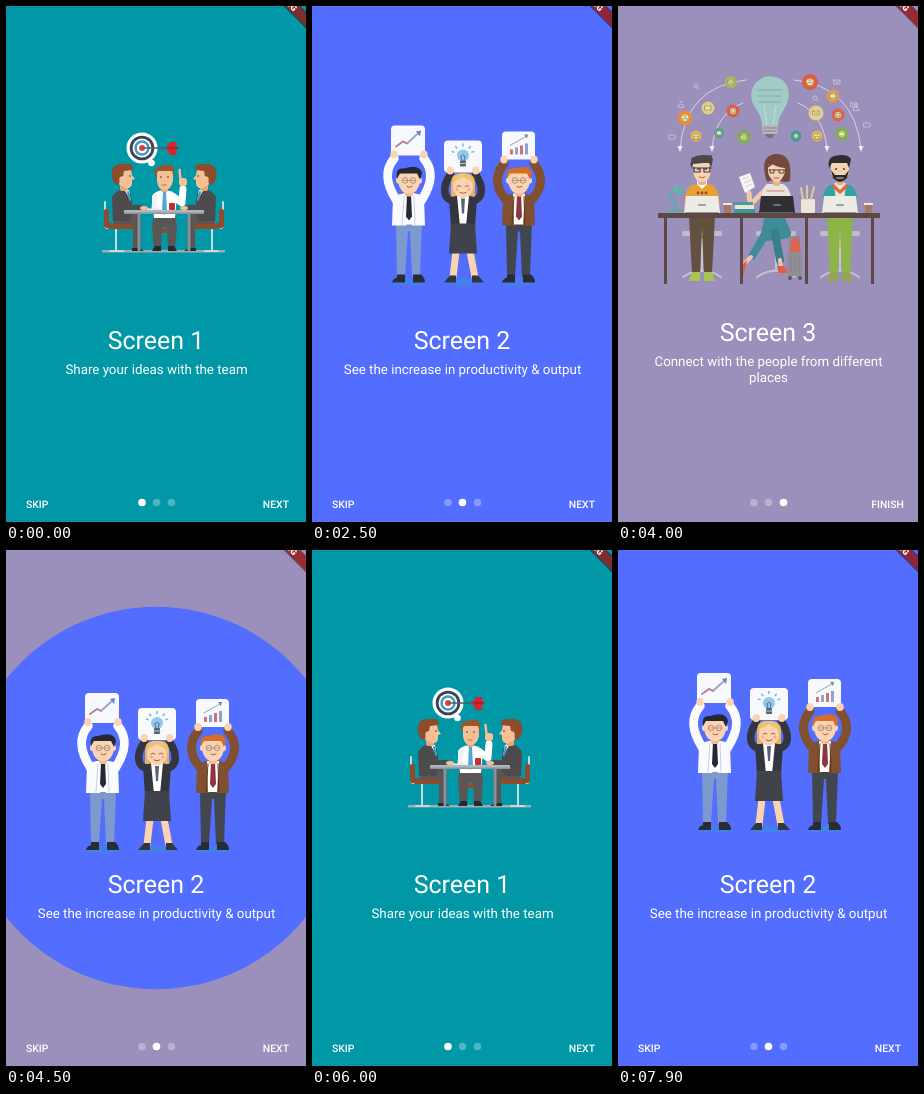
These frames come from a looping animation (300x516 px, 8 s). An HTML page:

```html
<!DOCTYPE html>
<html lang="en">
<head>
<meta charset="utf-8">
<title>Onboarding</title>
<style>
  html, body { margin: 0; width: 100%; height: 100%; overflow: hidden; }
  #stage { position: relative; width: 300px; height: 516px; overflow: hidden; }
  .page, svg { position: absolute; left: 0; top: 0; width: 300px; height: 516px; }
  text { font-family: Roboto, sans-serif; fill: #fff; text-rendering: geometricPrecision; }
  .title { font-size: 25px; text-anchor: middle; }
  .body { font-size: 13.33px; text-anchor: middle; }
  .button { font-size: 10.4px; font-weight: 500; }
  .banner { font-size: 8.5px; font-weight: 900; text-anchor: middle; }
  #controls { z-index: 5; }
</style>
</head>
<body>
<div id="stage"></div>
<script>
const LOOP = 8000, STEP = 100, SINK = 400, REVEAL = 380, DROP = 50;
const CENTER = '150px 248px', FULL_RADIUS = 308;

// Each swap lowers the artwork, opens the next page in a circle, then lifts the artwork.
const swaps = [
  { to: 1, down: 1470, reveal: 1729, up: 1870 },
  { to: 2, down: 2380, reveal: 2790, up: 2981 },
  { to: 1, down: 3960, reveal: 4264, up: 4396 },
  { to: 0, down: 5300, reveal: 5600, up: 5764 },
  { to: 1, down: 7200, reveal: 7500, up: 7655 },
];

const rect = (x, y, w, h, fill, r = 0) =>
  `<rect x="${x}" y="${y}" width="${w}" height="${h}" rx="${r}" fill="${fill}"/>`;
const disc = (x, y, r, fill) => `<circle cx="${x}" cy="${y}" r="${r}" fill="${fill}"/>`;
const oval = (x, y, rx, ry, fill) =>
  `<ellipse cx="${x}" cy="${y}" rx="${rx}" ry="${ry}" fill="${fill}"/>`;
const shape = (d, fill) => `<path d="${d}" fill="${fill}"/>`;
const line = (d, color, width = 1) =>
  `<path d="${d}" fill="none" stroke="${color}" stroke-width="${width}" stroke-linecap="round" stroke-linejoin="round"/>`;
const move = (x, y, content) => `<g transform="translate(${x} ${y})">${content}</g>`;
const mirror = (axis, content) =>
  `<g transform="translate(${axis * 2} 0) scale(-1 1)">${content}</g>`;

const SKIN = '#fbd3b0', DARK = '#34363f';

function meeting() {
  const suit = '#4d4b4b', pants = '#5b5654', steel = '#cbd8dc', wood = '#8d4c2c', face = '#f6bf95';
  const seated =
    line('M99 196V220Q99 222 102 222H110V244', steel, 2) + line('M104 245H117', steel, 2) +
    rect(98, 203, 5, 19, wood, 2) + rect(102, 217, 25, 6, wood, 1) +
    shape('M108 207H129Q135 208 135 214V243H127V218H108Z', pants) +
    shape('M126 242H133L138 245H126Z', '#26282c') +
    shape('M106 191Q110 184 117 183L125 188 127 205 124 215H107Z', suit) +
    shape('M118 183L123 184 125 195Z', '#fff') +
    line('M122 186L124 194', '#399bc4', 2) +
    line('M113 191Q113 201 121 202H134', suit, 6) +
    oval(138, 202, 4, 2, face) +
    rect(114, 176, 8, 9, '#e8a67a', 2) +
    shape('M113 164H125L126 169 129 173 126 174V178Q125 183 119 182L112 178Z', face) +
    shape('M106 172Q104 160 113 158H122Q128 158 127 164L118 165 117 170 114 171 113 179Q108 179 106 172Z', wood) +
    disc(115, 173, 1.7, face) + disc(124, 170, .8, '#333');
  const boss =
    rect(148, 222, 22, 5, wood, 1) +
    shape('M148 208H169L171 220 169 244H162L161 221H156L155 244H148L146 220Z', pants) +
    shape('M146 245L149 240H155V245ZM162 240H168L171 245H162Z', '#26282c') +
    line('M168 191L176 197 177 183', '#fff', 7) +
    shape('M146 190Q149 185 157 184Q167 184 171 190L169 212H148Z', '#fff') +
    line('M149 190L148 203 157 207', '#eef3f5', 5) +
    shape('M157 186H160L161 205 158.500 209 156 205Z', '#4ea7d4') +
    rect(155, 179, 7, 7, '#e8a67a', 2) +
    shape('M151 164H167V175Q165 184 158.500 184Q152 184 151 175Z', face) +
    shape('M149 171Q147 160 155 160Q164 156 168 162L168 171 166 165H152Z', '#9b552d') +
    disc(155, 171, .8, '#333') + disc(162, 171, .8, '#333') + line('M156 179H160', '#a55', .8) +
    rect(173, 172, 8, 8, face, 3) + line('M174.500 173L173.500 164', face, 2.4);
  const target = disc(136, 142, 15.5, '#fff') + disc(145.500, 157, 3.3, '#fff') +
    [[12.3, '#384454'], [9.5, '#fff'], [7.7, '#459ac1'], [5.2, '#fff'], [3, '#d94736']]
      .map(([r, c]) => disc(136, 142, r, c)).join('') +
    line('M137 142H164', '#555d66', 1.5) +
    shape('M160 142L164 136H171L169 139 173 142 169 145 171 149H164Z', '#d8232d') +
    line('M162 142H171', '#861f25', 1);
  return rect(96, 244, 123, 2.5, '#9eacb4') + boss + seated + mirror(158, seated) +
    line('M133 207V244M183 207V244', '#87919a', 3) +
    rect(118, 204, 80, 4, '#aeb7bd', 1) + rect(118, 206.500, 80, 1.5, '#8b959b') +
    rect(163, 197, 6, 7, '#c42d35', 1) + rect(141, 202.500, 13, 1.5, '#e7edf0') + target;
}

function cheering() {
  const arms = (width, y, color, thick) => [-1, 1].map(s =>
    line(`M${s * width * .74} ${y + 5}C${s * width * 1.24} ${y + 17} ${s * width * 1.17} ${y + 30} ${s * width * .62} 194`, color, thick) +
    oval(s * width * .75, y + 1, 3.7, 4, SKIN)).join('');
  const card = (x, y, w, h) => rect(x, y, w, h, '#f7f9fd', 4);
  const faceMarks = line('M-6 174H6', '#9a8371', .7) +
    [-4, 4].map(x => `<circle cx="${x}" cy="174" r="2.800" fill="none" stroke="#9a8371" stroke-width=".8"/>`).join('') +
    line('M-2 180Q0 182 3 180', '#a75b4c', 1);
  const shadow = oval(0, 275.500, 18, 3.5, '#4380eb');
  const man = (coat, shade, pants, hair, tie, handY) =>
    shadow +
    shape('M-13 215H13L11 270H3L1 225H-1L-4 270H-12Z', pants) +
    shape('M-12 268H-4V276H-17Q-16 272 -12 271ZM4 268H12Q16 271 16 276H4Z', '#292c37') +
    arms(20, handY, coat, 9) +
    shape('M-16 191Q-8 186 0 187Q9 186 15 191L16 219H3L0 200-3 219H-17Z', coat) +
    shape('M-6 187H6L4 218H-5Z', '#fff') + line('M-5 190L-7 218M5 190L6 218', shade) +
    shape('M-2 188H2L3 210 0 214-3 210Z', tie) +
    rect(-4, 181, 8, 9, '#f1ba8f', 2) +
    shape('M-11 165H11V176Q8 188 0 187Q-8 188-11 176Z', SKIN) +
    oval(-11, 174, 2, 3, SKIN) + oval(11, 174, 2, 3, SKIN) +
    shape('M-12 172Q-14 161-5 162Q11 157 13 167L11 173 8 167H-9Z', hair) + faceMarks;
  const woman = shadow +
    line('M-7 245L-10 271M7 245L12 271', SKIN, 7) +
    shape('M-13 269H-7V276H-19ZM9 269H15L21 276H9Z', DARK) +
    arms(17, 163, DARK, 7.5) +
    shape('M-11 171Q-7 166 0 167Q11 166 12 175V190H-12V176Z', '#e9b35e') +
    shape('M-14 192Q0 185 14 192L12 221H-12Z', DARK) +
    shape('M-6 189H6L3 220H-3Z', '#fff') + shape('M-2 192H2L1 207H-1Z', '#536173') +
    shape('M-12 217H12L14 247H-14Z', '#41434c') +
    rect(-4, 184, 8, 7, '#f1ba8f', 2) +
    oval(0, 180.500, 10, 10.5, SKIN) + shape('M-11 179Q-11 167 0 167Q11 167 11 179L8 174Q3 173 0 170Q-3 173-8 174Z', '#f0c16f') +
    line('M-6 180Q-4 178-2 180M2 180Q4 178 6 180M-3 186Q0 188 3 186', '#8d5845', .9) +
    disc(-6, 183, 1.5, '#f4a88d') + disc(6, 183, 1.5, '#f4a88d');
  const rays = [-70, -40, 0, 40, 70].map(a =>
    `<path d="M0-9V-12" stroke="#71b7e5" stroke-width="1.500" transform="translate(151 149) rotate(${a})"/>`).join('');
  const bulb = disc(151, 149, 6, '#90c8ec') + line('M149 150L150 155M153 150L152 155M149 150L151 148 153 150', '#496c94', .9) +
    rect(148, 154, 6, 6, '#55646f', 1) + line('M148 157H154', '#b7c7d0') + rays;
  return card(79, 119, 34, 30) + line('M84 140L91 135 95 137 107 126', '#9aa9d0', 2) +
    line('M84 140L91 135 95 137', '#cf7377', 1.3) + shape('M104 125L109 124 108 130Z', '#6382d3') +
    card(132, 134, 38, 32) + bulb +
    card(190, 125, 33, 28) +
    [0, 1, 2, 3].map(i => rect(198 + i * 5, 143 - i * 2, 3, 5 + i * 2, i % 2 ? '#8ca4cf' : '#d06f75')).join('') +
    line('M198 139L205 135 214 130', '#8b99b6', .9) + shape('M212 128L216 128 215 132Z', '#7183ae') +
    move(97, 0, man('#fafbff', '#c5d0e5', '#7d9acf', '#252832', '#242936', 147)) +
    move(151, 0, woman) +
    move(207, 0, man('#805030', '#603719', '#42464e', '#d66e28', '#8d3641', 152));
}

function connected() {
  const desktop = '#5d4844';
  const laptop = (x, fill, dot) =>
    shape(`M${x - 16} 202H${x + 16}L${x + 18} 219H${x - 18}Z`, fill) + line(`M${x - 3} 211H${x + 3}`, dot, 2) +
    line(`M${x - 16} 219H${x + 16}`, '#777b82', 1.3);
  const chair = x => line(`M${x} 245V277M${x - 19} 283Q${x} 270 ${x + 19} 283`, '#c9c3cf', 2) +
    rect(x - 20, 237, 40, 5, '#c4bbcb', 2);
  const legs = (x, fill, shoe) =>
    shape(`M${x - 13} 222H${x + 13}L${x + 10} 280H${x + 2}L${x} 234 ${x - 2} 280H${x - 10}Z`, fill) +
    shape(`M${x - 10} 278H${x - 2}V287H${x - 13}ZM${x + 2} 278H${x + 10}L${x + 13} 287H${x + 2}Z`, shoe);
  const head = (x, hair, chin = '') => rect(x - 4, 181, 8, 10, '#e8b28b', 2) +
    shape(`M${x - 9} 168H${x + 9}V178Q${x + 7} 188 ${x} 188Q${x - 7} 188 ${x - 9} 178Z`, '#f5d3b3') + chin +
    shape(`M${x - 11} 174Q${x - 13} 164 ${x - 6} 162Q${x + 7} 159 ${x + 11} 165L${x + 9} 174 ${x + 7} 169H${x - 8}Z`, hair) +
    disc(x - 4, 175, .9, '#333') + disc(x + 4, 175, .9, '#333');
  const torso = (x, fill) => shape(`M${x - 17} 219Q${x - 19} 195 ${x - 10} 191L${x} 189 ${x + 10} 191Q${x + 19} 195 ${x + 17} 219Z`, fill);
  const leftMan = chair(84) + legs(84, '#63503f', '#a8c455') + torso(84, '#e5a136') +
    shape('M79 190L84 195 89 190V187H79Z', '#fff') + head(84, '#4b4849') +
    shape('M73 164L94 161 93 168 76 170Z', '#4b4849') +
    line('M75 174H93M76 173V178H82V174M86 174V178H92V173', '#353740', 1.2) +
    line('M81 183Q84 185 87 183', '#a76a57') +
    [-4, 0, 4].map(x => disc(84 + x, 199, 1.4, '#7e5731')).join('') + laptop(84, '#ecebe6', '#a0a19f');
  const beard = shape('M213 176L217 181H227L231 176 229 184Q222 192 215 184Z', '#302d30') +
    line('M219 184H225', '#f2c4a4', 1.2);
  const rightMan = chair(222) + legs(222, '#8db447', '#93a657') + torso(222, '#36a29d') +
    shape('M216 189H228L225 218H219Z', '#e2e4da') + shape('M215 189L222 196 229 189V194L222 200 215 194Z', '#e4673f') +
    head(222, '#302d30', beard) + laptop(222, '#ecebe6', '#a0a19f');
  const woman = chair(158) +
    shape('M147 222H166L173 238Q174 244 166 245L148 247 136 266 130 262 143 239Z', '#3f8b97') +
    line('M157 239L162 266', '#397e8a', 8) +
    line('M133 263L126 270M162 266L163 274', '#f2c6a4', 4) +
    shape('M129 266L125 283 121 274ZM160 272H166L171 279H160Z', '#e25b4d') +
    line('M147 196L132 211 131 199', '#f0c9ab', 5) +
    shape('M143 219Q142 195 149 190H165Q175 195 174 219Z', '#e9e3dc') +
    line('M149 197H166M148 203H169M148 209H170', '#d9786c', 1) +
    rect(155, 183, 7, 9, '#e9b38e', 2) +
    shape('M147 181Q143 161 158 160Q175 159 172 187Q164 190 159 184L149 188Z', '#74483a') +
    shape('M150 170L167 171V178Q164 188 158 188Q151 185 150 178Z', '#f6d1b0') +
    shape('M148 175Q152 163 168 168L167 174Q158 173 155 170Z', '#74483a') +
    line('M151 176H167M152 176V179H156V176M161 176V179H166V176', '#46343c', .9) +
    line('M156 184H161', '#d15650', 1) + laptop(159, '#302f32', '#707176') +
    shape('M121 183L132 179 137 193 127 199Z', '#f7f6f2') +
    line('M125 185L130 183M126 189L133 186M128 193L134 190', '#c7bfce', .8);

  const icons = [
    [67, 124, 7.5, '#e88c40'], [90, 114, 6.5, '#e5cb83'], [113, 88, 6, '#a6b955'], [115, 117, 6.5, '#db6047'],
    [78, 142, 5.5, '#e9b04b'], [101, 139, 5, '#4a9e9f'], [126, 143, 7, '#82ae55'], [178, 142, 5.5, '#3c9b9d'],
    [192, 88, 8, '#df5b42'], [215, 102, 6.5, '#e29a48'], [198, 119, 7.5, '#e7cb89'], [220, 121, 6.5, '#d9664a'],
    [199, 142, 5.5, '#e0b256'], [224, 140, 7, '#80ae54'],
  ];
  const glyphs = ['M-3 3Q-3 0 0 0Q3 0 3 3ZM-1.500-2H1.500', 'M-3-2H3V2H-3Z', 'M-3-2H3V2H-3ZL0 1 3-2', 'M-2 0A2 2 0 1 0 2 0A2 2 0 1 0-2 0M1 1L3 3'];
  const badge = ([x, y, r, fill], i) =>
    move(x, y, disc(0, 0, r, fill) + disc(0, 0, r * .45, '#f1e3c4') + line(glyphs[i % 4], '#91a762'));
  const faint = [[78, 92], [63, 110], [54, 143], [236, 111], [197, 104], [238, 113], [249, 131], [219, 88]]
    .map(([x, y], i) => move(x, y, line(glyphs[(i + 3) % 4], '#c9c1d6', .9))).join('');
  const arcs = line('M128 86Q68 92 62 154M125 109Q98 119 94 154M176 86Q236 92 243 154M180 109Q205 119 209 154', '#e0d9e9', .9) +
    [62, 94, 209, 243].map(x => shape(`M${x - 2.500} 152H${x + 2.500}L${x} 158Z`, '#f2edf6')).join('');
  const bulb = shape('M144 132Q144 123 138 115Q130 103 135 93Q140 83 152 82Q166 83 170 94Q173 105 165 117Q160 125 160 132Z', '#a2cbc5') +
    line('M149 131L146 112M155 131L158 112', '#c1dcd8') +
    [96, 102, 108].map((y, i) => line(`M${139 + i} ${y}H${164 - i}`, '#8fbcb9', 2)).join('') +
    rect(144, 131, 16, 9, '#bbb6bd', 2) + line('M145 134H159M145 137H159', '#8a858d') + shape('M147 140H157L154 144H150Z', '#77727a');
  const desk = rect(40, 219, 222, 5, desktop) +
    [46, 122, 187, 253].map(x => rect(x, 224, 3, 66, desktop)).join('') +
    line('M49 217H65M57 217V209L51 202 59 193', '#5faaa9', 2.5) + shape('M57 190L67 197 62 202 55 198Z', '#66b0ad') +
    rect(116, 215, 21, 4, '#3d969b') + rect(117, 211, 19, 4, '#eee3cf') + rect(115, 208, 20, 3, '#4d9ca0') +
    rect(183, 205, 14, 14, '#eee7d9', 1) + line('M185 205L183 194M189 205V192M193 205L196 193', '#d8cba0', 2) +
    [106, 247].map(x => rect(x, 210, 7, 9, '#a87860', 1) + rect(x - 1, 209, 9, 2, '#f1e8dc')).join('');
  const luggage = line('M172 258V243H181V258', '#8a858d', 1.5) + shape('M174 244H180L183 258H171Z', '#de6650') +
    rect(169, 258, 15, 24, '#918e95', 3) +
    line('M173 262V278M177 262V278M181 262V278', '#817e86') + disc(172, 284, 2, '#5c5660') + disc(182, 284, 2, '#5c5660');
  return arcs + faint + icons.map(badge).join('') + bulb + leftMan + woman + rightMan + luggage + desk;
}

// "rise" lifts each drawing to its resting place.
const pages = [
  { color: '#0097a7', art: meeting, rise: 0, titleY: 342.5, body: ['Share your ideas with the team'], bodyY: 368 },
  { color: '#536dfe', art: cheering, rise: 6, titleY: 342.5, body: ['See the increase in productivity & output'], bodyY: 368 },
  { color: '#9b90bc', art: connected, rise: 13, titleY: 334.5, body: ['Connect with the people from different', 'places'], bodyY: 360 },
];
const svg = (id, content) => `<svg id="${id}" viewBox="0 0 300 516">${content}</svg>`;
const stage = document.getElementById('stage');

stage.innerHTML = pages.map((p, i) => `<div class="page" style="background:${p.color}">` + svg('page' + i,
  `<g class="art">${p.art()}</g><text class="title" x="150" y="${p.titleY}">Screen ${i + 1}</text>` +
  p.body.map((s, n) => `<text class="body" x="150.500" y="${p.bodyY + n * 15.6}">${s.replace('&', '&amp;')}</text>`).join('')
) + '</div>').join('') + svg('controls',
  '<text class="button" id="skip" x="20" y="502">SKIP</text><text class="button" id="next" y="502"></text>' +
  [136, 150.500, 165.500].map(x => `<circle class="dot" cx="${x}" cy="496.500" r="3.800" fill="#fff"/>`).join('') +
  '<circle id="touch" cy="442" r="8" fill="#fff"/>' +
  '<g transform="translate(280 -6) rotate(45)">' + rect(-40, -6, 80, 12, 'rgba(0,0,0,.45)') +
  rect(-40, -5, 80, 10, 'rgba(183,28,28,.7)') + '<text class="banner" y="3">DEBUG</text></g>');

const layers = [...stage.querySelectorAll('.page')], arts = [...stage.querySelectorAll('.art')];
const dots = [...stage.querySelectorAll('.dot')];
const [skip, next, touch] = ['skip', 'next', 'touch'].map(id => document.getElementById(id));
const unit = x => Math.min(1, Math.max(0, x));
const easeOut = x => 1 - (1 - x) ** 1.7;

function render(time) {
  let current = 0, previous = 0, opening = 1, lift = 1;
  for (const s of swaps) {
    if (time >= s.down) lift = easeOut(time < s.up ? 1 - unit((time - s.down) / SINK) : unit((time - s.up) / SINK));
    if (time >= s.reveal) {
      previous = current;
      current = s.to;
      opening = unit((time - s.reveal) / REVEAL);
    }
  }
  layers.forEach((layer, i) => {
    layer.style.zIndex = i === current ? 2 : i === previous ? 1 : 0;
    layer.style.clipPath = i === current && opening < 1 ? `circle(${opening * FULL_RADIUS}px at ${CENTER})` : 'none';
    arts[i].setAttribute('transform', `translate(0 ${DROP * (1 - lift) - pages[i].rise})`);
    dots[i].setAttribute('opacity', i === current ? 1 : .3);
  });
  const last = current === 2;
  skip.setAttribute('opacity', last ? 0 : 1);
  next.setAttribute('x', last ? 253.3 : 256.8);
  next.textContent = last ? 'FINISH' : 'NEXT';
  touch.setAttribute('cx', 154 + 86 * (1 - unit((time - 1550) / 200)));
  touch.setAttribute('opacity', time >= 1600 && time < 1900 ? .22 : 0);
}

let start;
function tick(now) {
  start ??= now;
  render(Math.floor((now - start) % LOOP / STEP) * STEP);
  requestAnimationFrame(tick);
}
render(0);
requestAnimationFrame(tick);
</script>
</body>
</html>
```
